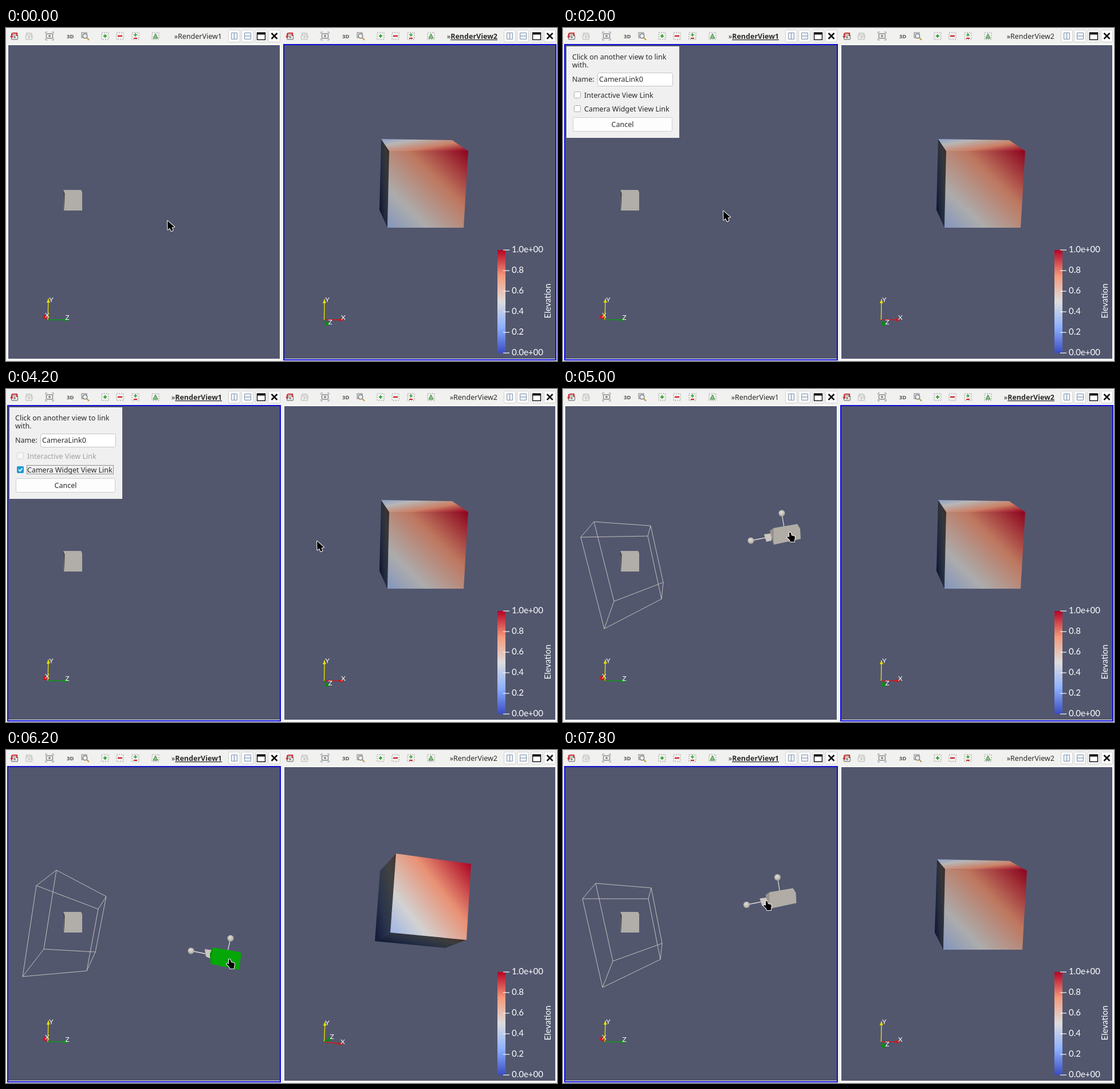
Animation, 962 px wide and 582 px high, one loop 8 s. Source, as an HTML page:

```html
<!DOCTYPE html>
<html lang="en">
<head>
<meta charset="utf-8">
<title>Linked camera views</title>
<style>
html, body { margin: 0; width: 100%; height: 100%; overflow: hidden; background: #f1f1f0; }
svg { display: block; }
text { font: 12.5px "Noto Sans", "Open Sans", sans-serif; fill: #2b2b2b; white-space: pre; }
.title tspan.on { font-weight: 700; text-decoration: underline; }
.label { font: 15px Lato, sans-serif; fill: #fff; }
.axis text { font: 12px Lato, sans-serif; fill: #fff; }
.axis line { stroke-width: 1.4; }
.wire { fill: none; stroke: #c3bfbb; stroke-width: 1; }
.btn { fill: #fdfdfd; stroke: #cfcfcf; }
.off { opacity: .4; }
</style>
</head>
<body>
<svg width="962" height="582" viewBox="0 0 962 582">
  <defs>
    <linearGradient id="bar" x1="0" y1="1" x2="0" y2="0"></linearGradient>
    <radialGradient id="ball" cx=".45" cy=".4" r=".6">
      <stop offset="0" stop-color="#e4e0d9"/><stop offset="1" stop-color="#aaa69f"/>
    </radialGradient>
    <g id="snap">
      <rect x="-5.500" y="-5" width="11" height="8" rx="1.500" fill="none" stroke="#8b8b8b" stroke-width="1.500"/>
      <circle cy="-1" r="2" fill="#8b8b8b"/>
    </g>
    <g id="dots"><rect x="-6" y="-6" width="12" height="12" fill="none" stroke="#929292" stroke-dasharray="2 2"/></g>
    <g id="tools">
      <g transform="translate(14 14)">
        <use href="#snap" x="1" y="3"/>
        <path d="M-4 1V-3Q-4-5-1-5H5V0" fill="none" stroke="#c83232" stroke-width="2.200"/>
        <path d="M-7 0h6l-3 4z" fill="#c83232"/>
      </g>
      <g transform="translate(41 14)" class="off">
        <use href="#snap" x="-1" y="3"/>
        <path d="M4 1V-3Q4-5 1-5H-5V0" fill="none" stroke="#999" stroke-width="2"/>
        <path d="M1 0h6l-3 4z" fill="#999"/>
      </g>
      <g transform="translate(76 14)">
        <use href="#snap" y="1"/>
        <path d="M-7-4v-3h3M7-4v-3h-3M-7 4v3h3M7 4v3h-3" fill="none" stroke="#7d8fa0"/>
      </g>
      <text x="106" y="18" style="font-size:9.500px;font-weight:700;fill:#555">3D</text>
      <g transform="translate(138 14)">
        <rect x="-6" y="-6" width="9" height="9" fill="#d8d8d8" stroke="#888"/>
        <circle cx="0" cy="0" r="3.800" fill="#e7edf2" stroke="#777" stroke-width="1.300"/>
        <path d="M3 3l4 4" stroke="#c09a3c" stroke-width="2.200"/>
      </g>
      <g transform="translate(173 14)"><use href="#dots"/><path d="M-3 0h6M0-3v6" stroke="#31a02e" stroke-width="2"/></g>
      <g transform="translate(199 14)"><use href="#dots"/><path d="M-4 0h8" stroke="#cf2525" stroke-width="2.500"/></g>
      <g transform="translate(226 14)"><use href="#dots"/><path d="M-3-2h6M0-5v6" stroke="#31a02e" stroke-width="1.600"/><path d="M-3 4h6" stroke="#cf2525" stroke-width="2"/></g>
      <g transform="translate(261 14)"><use href="#dots"/><path d="M-4 4L0-4L4 4z" fill="#8cc48a" stroke="#39853a"/></g>
      <rect class="btn" x="388.500" y="3.500" width="20" height="21" rx="2"/>
      <rect class="btn" x="411.500" y="3.500" width="20" height="21" rx="2"/>
      <rect class="btn" x="435.500" y="3.500" width="20" height="21" rx="2"/>
      <rect class="btn" x="458.500" y="3.500" width="20" height="21" rx="2"/>
      <path d="M393.500 8.500h10v11h-10zM398.500 8v12M416.500 8.500h11v11h-11zM416 14h12" fill="#eef3f8" stroke="#7f93ad"/>
      <path d="M438.500 8.500h14v12h-14z" fill="#fff" stroke="#151515" stroke-width="1.500"/>
      <path d="M438 9.500h15" stroke="#151515" stroke-width="4"/>
      <path d="M463.500 9l10 10M473.500 9l-10 10" stroke="#151515" stroke-width="2.700"/>
    </g>
  </defs>

  <rect width="962" height="582" fill="#f1f1f0"/>
  <use href="#tools"/><use href="#tools" x="481"/>
  <text class="title" x="377" y="19" text-anchor="end">»<tspan id="name0">RenderView1</tspan></text>
  <text class="title" x="858" y="19" text-anchor="end">»<tspan id="name1">RenderView2</tspan></text>
  <path d="M2 28h478v553H2zM484 28h477v553H484z" fill="#fafafa"/>
  <path d="M4 30h474v548H4zM486 30h473v548H486z" fill="#52576e"/>
  <rect id="frame0" x="3" y="29" width="476" height="551" fill="none" stroke="#0d0dd8" stroke-width="2"/>
  <rect id="frame1" x="485" y="29" width="475" height="551" fill="none" stroke="#0d0dd8" stroke-width="2"/>

  <path d="M100 283h31l2 4v32h-32z" fill="#b1ada8"/>
  <path d="M100 283l2.500 6-1 30z" fill="#38383a"/>
  <g id="axis0" class="axis"></g>
  <g id="axis1" class="axis"></g>
  <g id="cube"></g>

  <g id="scale">
    <rect x="858" y="388" width="14" height="180" fill="url(#bar)"/>
    <text class="label" transform="translate(951 477) rotate(-90)" text-anchor="middle">Elevation</text>
  </g>

  <g id="camera">
    <path id="box" class="wire"/>
    <path id="stems" stroke="#dedad4" stroke-width="1.300"/>
    <polygon id="cone" fill="#cbc7c0"/>
    <polygon id="body"/>
    <polygon id="side" fill="#000" opacity=".15"/>
    <circle id="ball0" r="5.500" fill="url(#ball)"/>
    <circle id="ball1" r="5.500" fill="url(#ball)"/>
  </g>

  <g id="dialog">
    <rect x="6" y="32" width="197" height="160" fill="#f0f0f0"/>
    <text x="16" y="55">Click on another view to link</text>
    <text x="16" y="69">with.</text>
    <text x="16" y="94">Name:</text>
    <rect x="60.500" y="78.500" width="131" height="23" rx="3" fill="#fff" stroke="#c4c4c4"/>
    <text x="63" y="94">CameraLink0</text>
    <g id="interactive">
      <rect x="19.500" y="111.500" width="11" height="11" rx="2" fill="#fff" stroke="#aaa"/>
      <text x="37" y="122">Interactive View Link</text>
    </g>
    <rect x="19.500" y="135.500" width="11" height="11" rx="2" fill="#fff" stroke="#aaa"/>
    <g id="checked">
      <rect x="19" y="135" width="12" height="12" rx="2" fill="#1e9bd3"/>
      <path d="M22 141l2.500 2.500 4-5" fill="none" stroke="#fff" stroke-width="1.800"/>
    </g>
    <text x="37" y="146">Camera Widget View Link</text>
    <rect id="focus" x="36.500" y="133.500" width="151" height="15" fill="none" stroke="#333" stroke-dasharray="1 1"/>
    <rect x="17.500" y="156.500" width="173" height="24" rx="2" fill="#fdfdfd" stroke="#cfcfcf"/>
    <text x="104" y="173" text-anchor="middle">Cancel</text>
  </g>

  <g id="menu">
    <rect x="281.500" y="336.500" width="215" height="65" fill="#fff" stroke="#e4e4e4"/>
    <rect id="hover" x="282" width="215" height="22" fill="#e5e5e5"/>
    <text x="304" y="352">Show All Blocks</text>
    <text x="304" y="374">Link Camera...</text>
    <rect x="287" y="385" width="12" height="12" rx="2" fill="#1e9bd3"/>
    <path d="M290 391l2.500 2.500 4-5" fill="none" stroke="#fff" stroke-width="1.800"/>
    <text x="304" y="395">Show Frame Decorations</text>
  </g>

  <g id="cursor" fill="#000" stroke="#fff" stroke-width="2" stroke-linejoin="round" paint-order="stroke">
    <path id="arrow" d="M0 0L.5 15.500 4 12.500 6.500 18 9.500 16.500 7.500 11.500 12 10.500z"/>
    <path id="hand" d="M-1 0Q1-1 2 1L3 5 8 6Q9 7 9 9L8 13V16H1L0 13-5 8Q-4 6-1 8z"/>
  </g>
</svg>

<script>
const $ = id => document.getElementById(id);
const set = (el, attrs) => { for (const k in attrs) el.setAttribute(k, attrs[k]); return el; };
const make = (tag, parent, attrs) =>
  parent.appendChild(set(document.createElementNS("http://www.w3.org/2000/svg", tag), attrs));
const show = (id, on) => { $(id).style.display = on ? "" : "none"; };
const mix = (a, b, k) => a.map((v, i) => v + (b[i] - v) * k);
const pairs = a => Array.from({ length: a.length / 2 }, (_, i) => [a[2 * i], a[2 * i + 1]]);

const coolWarm = [[59, 76, 192], [141, 176, 254], [221, 221, 221], [244, 153, 122], [180, 4, 38]];
const rgb = (c, shade = 1) => `rgb(${c.map(v => Math.round(v * shade))})`;
const addStops = grad => coolWarm.map((c, i) => make("stop", grad, { offset: i / 4, "stop-color": rgb(c) }));

// Corner order: front TL, TR, BR, BL, then back TL, TR, BR, BL
const cubePose = {
  start: [669,215, 807,215, 799,349, 666,349, 655,194, 779,196, 775,316, 652,318],
  low:   [681,181, 812,199, 804,332, 671,319, 653,211, 776,222, 767,346, 644,334],
  end:   [667,208, 810,211, 802,349, 664,349, 653,191, 780,194, 776,316, 649,319]
};
const boxPose = {
  start: [54,232, 153,239, 148,257, 31,259, 89,371, 175,338, 172,367, 72,419],
  low:   [88,210, 175,256, 161,278, 53,237, 66,348, 156,353, 141,386, 29,396],
  end:   [57,233, 154,241, 149,260, 34,260, 87,369, 173,338, 170,366, 69,415]
};
// Balls, stem ends, cone, body
const camStart = [382,217, 328,265, 386,242, 353,260, 351,254, 365,252, 364,265, 355,267,
  361,248, 368,243, 409,236, 414,244, 415,262, 368,272];
const camLow = [392,329, 323,351, 387,352, 348,356, 347,348, 361,350, 358,365, 349,361,
  356,356, 361,345, 407,353, 411,356, 407,384, 357,374];
// Tips of X, Y, Z, then their labels
const axisFlat = [589,510, 556,474, 560,517, 589,510, 561,479, 566,518];
const axisLow = [588,514, 557,475, 564,506, 588,514, 561,481, 569,505];

const scalar = [2, 3, 2, 1, 1, 2, 1, 0].map(v => v / 3);
const faces = [
  { ids: [4, 0, 3, 7], shade: [.25, .3] },
  { ids: [4, 5, 1, 0], shade: [.83, .83] },
  { ids: [3, 2, 6, 7], shade: [.27, .27] },
  { ids: [0, 1, 2, 3], shade: [.78, .95] }
];
faces.forEach((f, i) => {
  f.grad = make("linearGradient", $("cube"), { id: "face" + i, gradientUnits: "userSpaceOnUse" });
  f.stops = addStops(f.grad);
  f.shape = make("polygon", $("cube"), { fill: `url(#face${i})` });
});

addStops($("bar"));
["1.0e+00", "0.8", "0.6", "0.4", "0.2", "0.0e+00"].forEach((s, i) => {
  const y = 388 + 36 * i;
  make("path", $("scale"), { d: `M868 ${y}h11`, stroke: "#fff", "stroke-width": 1.2 });
  make("text", $("scale"), { class: "label", x: 883, y: y + 4 }).textContent = s;
});

function drawCube(pts, k) {
  const p = pairs(pts);
  for (const f of faces) {
    const [a, b, , d] = f.ids.map(i => p[i]);
    const [sa, sb, , sd] = f.ids.map(i => scalar[i]);
    const ux = b[0] - a[0], uy = b[1] - a[1], vx = d[0] - a[0], vy = d[1] - a[1];
    const det = ux * vy - uy * vx;
    f.shape.style.display = det > 0 ? "" : "none";
    if (det <= 0) continue;
    // Slope of the scalar field across the face
    const gx = ((sb - sa) * vy - (sd - sa) * uy) / det;
    const gy = ((sd - sa) * ux - (sb - sa) * vx) / det;
    const n = gx * gx + gy * gy;
    const x1 = a[0] - gx * sa / n, y1 = a[1] - gy * sa / n;
    set(f.grad, { x1, y1, x2: x1 + gx / n, y2: y1 + gy / n });
    const shade = f.shade[0] + (f.shade[1] - f.shade[0]) * k;
    f.stops.forEach((s, i) => set(s, { "stop-color": rgb(coolWarm[i], shade) }));
    set(f.shape, { points: f.ids.map(i => p[i]).join(" ") });
  }
}

function drawAxes(group, ox, oy, pts, names, colors) {
  group.textContent = "";
  const p = pairs(pts);
  names.forEach((name, i) => {
    const [x, y] = p[i], stroke = colors[i];
    const dx = x - ox, dy = y - oy, len = Math.hypot(dx, dy);
    make("line", group, { x1: ox, y1: oy, x2: x, y2: y, stroke });
    if (len > 15) {
      const ex = dx / len, ey = dy / len, bx = x - 7 * ex, by = y - 7 * ey;
      make("polygon", group, { fill: stroke,
        points: `${x},${y} ${bx - 3 * ey},${by + 3 * ex} ${bx + 3 * ey},${by - 3 * ex}` });
    } else make("circle", group, { cx: x, cy: y, r: 3.4, fill: stroke });
    make("text", group, { x: p[i + 3][0], y: p[i + 3][1], "text-anchor": "middle" }).textContent = name;
  });
}
drawAxes($("axis0"), 73, 510, [68,505, 74,473, 109,510, 72,506, 79,479, 107,510],
  ["X", "Y", "Z"], ["#d81414", "#e6de00", "#0a9a12"]);

function drawCamera(cam, box, green) {
  const c = pairs(cam), b = pairs(box), edge = (i, j) => `M${b[i]}L${b[j]}`;
  let d = "";
  for (let i = 0; i < 4; i++) {
    const n = (i + 1) % 4;
    d += edge(i, n) + edge(i + 4, n + 4) + edge(i, i + 4);
  }
  set($("box"), { d });
  set($("stems"), { d: `M${c[0]}L${c[2]}M${c[1]}L${c[3]}` });
  set($("cone"), { points: c.slice(4, 8).join(" ") });
  set($("body"), { points: c.slice(8).join(" "), fill: green ? "#05a608" : "#b1ada6" });
  set($("side"), { points: [c[8], c[9], c[13]].join(" ") });
  [0, 1].forEach(i => set($("ball" + i), { cx: c[i][0], cy: c[i][1] }));
}

// Time, x, y of the pointer
const pointer = [
  [0, 282, 337], [1200, 300, 350], [1400, 315, 364], [2000, 280, 320], [2200, 220, 260],
  [2400, 150, 195], [2600, 105, 155], [2800, 90, 142], [3400, 180, 170], [3600, 290, 200],
  [3800, 400, 230], [4000, 500, 255], [4200, 543, 266], [4800, 470, 246], [5000, 396, 251],
  [5800, 394, 291], [6000, 392, 331], [6200, 390, 366], [6400, 389, 340], [6600, 388, 298],
  [6800, 388, 260], [7000, 388, 258], [7600, 371, 261], [7800, 355, 264]
];
// Time, share of the lowest tilt
const tilts = [[0, 0], [5800, .35], [6000, .7], [6200, 1], [6400, .75], [6600, .36], [6800, 0]];
const at = (keys, t) => keys.filter(k => k[0] <= t).pop();

function render(t) {
  const within = (a, b) => t >= a && t < b;
  const left = within(600, 4400) || t >= 5400;
  [left, !left].forEach((on, i) => {
    show("frame" + i, on);
    set($("name" + i), { class: on ? "on" : "" });
  });

  show("menu", within(800, 1800));
  show("hover", t >= 1200);
  set($("hover"), { y: t < 1400 ? 337 : 358 });
  show("dialog", within(1800, 4400));
  show("focus", t >= 2800);
  show("checked", t >= 3000);
  set($("interactive"), { class: t >= 3000 ? "off" : "" });

  const k = at(tilts, t)[1], base = t < 6200 ? "start" : "end";
  const shift = t < 6200 ? [0, 0] : t < 7000 ? [-7.5, 8.5] : [-7.5, 5.5];
  drawCube(mix(cubePose[base], cubePose.low, k), k);
  drawAxes($("axis1"), 555.5, 510, mix(axisFlat, axisLow, k), ["X", "Y", "Z"], ["#d81414", "#e6de00", "#0a8a12"]);
  show("camera", t >= 4400);
  drawCamera(mix(camStart.map((v, i) => v + shift[i % 2]), camLow, k),
    mix(boxPose[base], boxPose.low, k), within(5400, 7200));

  const [, x, y] = at(pointer, t);
  set($("cursor"), { transform: `translate(${x} ${y})` });
  show("arrow", t < 5000);
  show("hand", t >= 5000);
}

const began = performance.now();
let last = -1;
function tick() {
  const t = Math.floor((performance.now() - began) % 8000 / 200) * 200;
  if (t !== last) render(last = t);
  requestAnimationFrame(tick);
}
tick();
</script>
</body>
</html>
```
